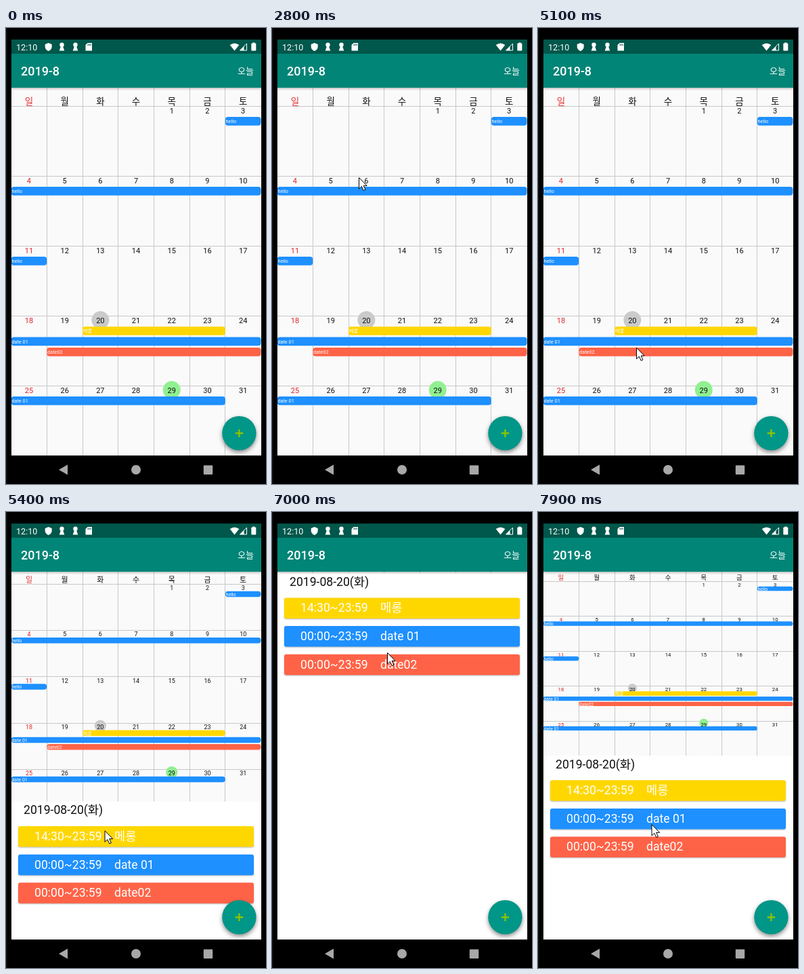
These frames come from a looping animation (384 by 672 pixels, 8 s). An HTML page with a canvas:

```html
<!DOCTYPE html>
<html lang="ko">
<head>
<meta charset="utf-8">
<title>Calendar</title>
<style>
html, body { margin: 0; width: 100%; height: 100%; overflow: hidden; background: #000; }
canvas { display: block; width: 384px; height: 672px; }
</style>
</head>
<body>
<canvas id="stage" width="384" height="672"></canvas>
<script>
const c = document.getElementById('stage').getContext('2d');
const LOOP = 8000, STEP = 100, SETTLE = 300, LAG = 16;
const FONT = 'Roboto, "Noto Sans CJK KR", "Noto Sans CJK", sans-serif';
const L = 8, R = 377, TOP = 88, BOTTOM = 630, FULL = BOTTOM - TOP, HALF = FULL / 2;
const GRID_X = 7.6, GRID_Y = TOP + 0.5, COL = 52.7;
const BLUE = '#1e90ff', GOLD = '#ffd700', RED = '#ff6347';

// row, level, first column, last column, colour, label
const events = [
  [0, 1, 6, 6, BLUE, 'hello'],
  [1, 1, 0, 6, BLUE, 'hello'],
  [2, 1, 0, 0, BLUE, 'hello'],
  [3, 1, 2, 5, GOLD, '메롱'],
  [3, 2, 0, 6, BLUE, 'date 01'],
  [3, 3, 1, 6, RED, 'date02'],
  [4, 1, 0, 5, BLUE, 'date 01']
];
const cards = [
  [GOLD, '14:30~23:59', '메롱'],
  [BLUE, '00:00~23:59', 'date 01'],
  [RED, '00:00~23:59', 'date02']
];

// resting places of the pointer: time, x, y
const stops = [
  [800, 258, 513], [2800, 128, 220], [3600, 112, 207], [4800, 145, 468],
  [5300, 145, 472], [6100, 159, 400], [6600, 161, 394], [7000, 170, 207],
  [7200, 170, 204], [7700, 167.5, 460]
];

const clamp = k => Math.min(1, Math.max(0, k));
const ease = k => (1 - Math.cos(Math.PI * clamp(k))) / 2;
const settle = (t, start) => ease((t - start) / SETTLE);

// The sheet opens on a tap, is swiped up, then swiped back down.
function sheetTop(t) {
  return FULL - HALF * (settle(t, 5200) + settle(t, 6717) - settle(t, 7420));
}

function pointerAt(t) {
  let [, x, y] = stops[0];
  for (let i = 1; i < stops.length; i++) {
    const [t0, x0, y0] = stops[i - 1], [t1, x1, y1] = stops[i];
    const k = ease((t - t0) / (t1 - t0));
    x += (x1 - x0) * k;
    y += (y1 - y0) * k;
  }
  return [x, y];
}

function rect(x, y, w, h, color) {
  c.fillStyle = color;
  c.fillRect(x, y, w, h);
}
function round(x, y, w, h, r, color) {
  c.fillStyle = color;
  c.beginPath();
  c.roundRect(x, y, w, h, r);
  c.fill();
}
function disc(x, y, r, color) {
  c.fillStyle = color;
  c.beginPath();
  c.arc(x, y, r, 0, Math.PI * 2);
  c.fill();
}
function shape(d, color) {
  c.fillStyle = color;
  c.fill(new Path2D(d));
}
function text(s, x, y, size, color, align = 'left', weight = 400) {
  c.font = `${weight} ${size}px ${FONT}`;
  c.textAlign = align;
  c.fillStyle = color;
  c.fillText(s, x, y);
}
function shadow(color, blur, dy) {
  c.shadowColor = color;
  c.shadowBlur = blur;
  c.shadowOffsetY = dy;
}

function drawStatus() {
  rect(L, 17, R - L, 21, '#00574b');
  text('12:10', 15, 32.5, 12.6, '#fff');
  shape('M62.7 22l5 2v4q-.4 4-5 6q-4.6-2-5-6v-4z', '#fff');
  for (const x of [82.5, 102.5]) {
    disc(x, 24.7, 3.2, '#fff');
    shape(`M${x - 1.6} 27h3.2l2.2 6.5h-7.6z`, '#fff');
  }
  shape('M120.5 22h6.5v11.5h-9.5v-8.5z', '#fff');
  for (let i = 0; i < 3; i++) rect(120.6 + 2 * i, 23.5, 1, 2.5, '#00574b');
  shape('M337.5 33.5l-6.8-8.5q6.8-5 13.6 0z', '#fff');
  c.strokeStyle = '#fff';
  c.lineWidth = 1;
  c.stroke(new Path2D('M355.5 23v10h-10z'));
  shape('M351.5 27v6h-6z', '#fff');
  rect(364.2, 21.5, 3.2, 2, '#fff');
  round(362.3, 22.6, 7, 11, 1, '#fff');
}

function drawAppBar() {
  rect(L, 38, R - L, 50, '#008577');
  const g = c.createLinearGradient(0, TOP, 0, TOP + 4);
  g.addColorStop(0, 'rgba(0,0,0,.22)');
  g.addColorStop(1, 'rgba(0,0,0,0)');
  rect(L, TOP, R - L, 4, g);
  text('2019-8', 22, 70.3, 18, '#fff', 'left', 500);
  text('오늘', 354, 67.6, 13, '#fff', 'center');
}

function drawCalendar(h) {
  const s = h / FULL, root = Math.sqrt(s);
  const head = h * 0.05, row = h * 0.19;
  const colX = i => GRID_X + i * COL;
  const rowY = i => GRID_Y + head + i * row;
  const collapsed = h < 12;

  for (let i = 1; i < 7; i++) rect(Math.floor(colX(i)), TOP, 1, h, '#c8c8c8');
  if (collapsed) return;
  for (let i = 0; i < 5; i++) rect(L, Math.floor(rowY(i)), R - L, 1, '#c8c8c8');

  [...'일월화수목금토'].forEach((d, i) =>
    text(d, colX(i + 0.5), TOP + head * 0.91, 13.5 * root, i ? '#111' : '#e53030', 'center'));

  const size = 11 * root;
  for (let day = 1; day <= 31; day++) {
    const n = day + 3, col = n % 7;
    const x = colX(col + 0.5), y = rowY(Math.floor(n / 7));
    if (day === 20) disc(x, y + 5.8 * s, 13 * s, '#cacaca');
    if (day === 29) disc(x, y + 5.8 * s, 13 * s, '#90f090');
    text(day, x, y + 2.9 + 0.65 * size, size, col ? '#111' : '#e02428', 'center');
  }

  const label = 7.3 * Math.pow(s, 0.1), bar = row * 0.124;
  for (const [r, level, a, b, color, name] of events) {
    const x = colX(a), y = rowY(r + level * 0.15);
    round(x, y, (b - a + 1) * COL, bar, Math.min(4, bar / 2), color);
    text(name, x + 0.8, y + bar / 2 + label * 0.4, label, '#fff');
  }
}

function drawSheet(y) {
  rect(L, y, R - L, BOTTOM - y, '#fff');
  text('2019-08-20(화)', 26, y + 18.6, 17.6, '#111');
  cards.forEach(([color, time, name], i) => {
    const top = y + 36.3 + i * 41.6;
    shadow('rgba(0,0,0,.28)', 2, 1);
    round(18, top, 348, 30.5, 3, color);
    shadow('transparent', 0, 0);
    text(time, 42, top + 20.9, 17.6, '#fff');
    text(name, 160, top + 20.9, 17.6, '#fff');
  });
}

function drawFab() {
  shadow('rgba(0,0,0,.45)', 6, 3);
  disc(344.4, 597.1, 25.2, '#009688');
  shadow('transparent', 0, 0);
  rect(338.6, 596, 11.6, 2.4, '#8cc400');
  rect(343.2, 591.4, 2.4, 11.6, '#8cc400');
}

function drawNav() {
  shape('M78 651l13-7.5v15z', '#a8a8a8');
  disc(192, 651, 7, '#a8a8a8');
  round(291.8, 644.5, 13.4, 13.4, 1, '#a8a8a8');
}

function drawPointer(x, y) {
  const d = 'M.5 .5v16.5l3.9-3.6 2.8 6.1 2.7-1.2-2.7-5.9h5z';
  c.save();
  c.translate(x, y);
  shape(d, '#fff');
  c.strokeStyle = '#000';
  c.lineWidth = 1;
  c.stroke(new Path2D(d));
  c.restore();
}

function draw(t) {
  const sheet = sheetTop(t);
  rect(0, 0, 384, 672, '#000');
  rect(0, 0, 2, 672, '#0d0d0d');
  c.save();
  c.beginPath();
  c.rect(L, TOP, R - L, FULL);
  c.clip();
  rect(L, TOP, R - L, FULL, '#fafafa');
  drawCalendar(Math.max(sheet, sheetTop(t - LAG)));
  if (sheet < FULL) drawSheet(TOP + sheet);
  drawFab();
  c.restore();
  drawStatus();
  drawAppBar();
  drawNav();
  if (t >= stops[0][0]) drawPointer(...pointerAt(t));
}

const start = performance.now();
function tick() {
  const t = (performance.now() - start) % LOOP;
  draw(Math.floor(t / STEP) * STEP);
  requestAnimationFrame(tick);
}
tick();
</script>
</body>
</html>
```
